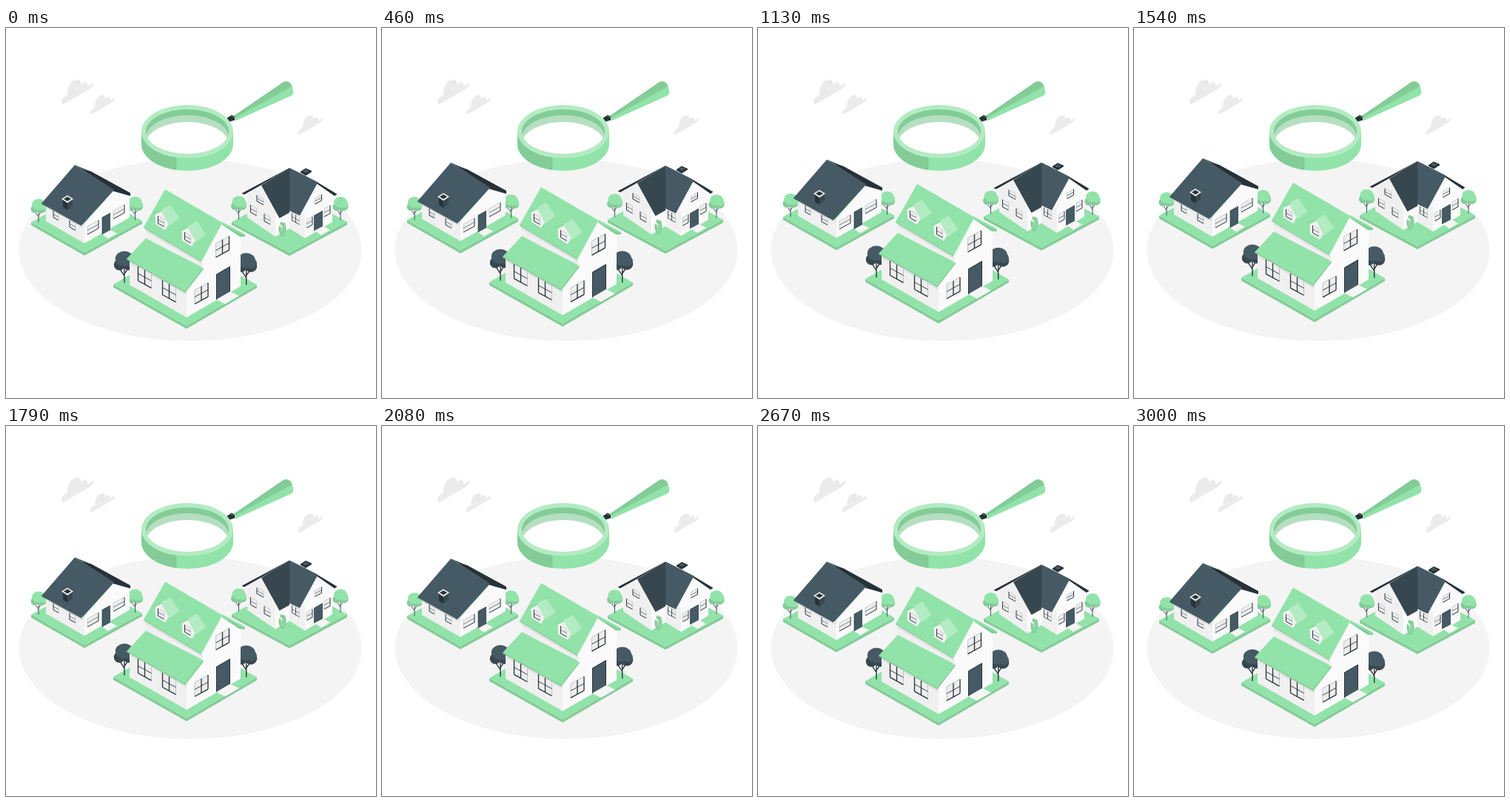
Write an HTML page with a canvas that moves like this. It is 500 by 500 pixels and loops after 3.04 s.

```html
<!DOCTYPE html>
<html lang="en">
<head>
<meta charset="utf-8">
<title>House search</title>
<style>
html, body { margin: 0; width: 100%; height: 100%; overflow: hidden; background: #fff; }
canvas { display: block; width: 500px; height: 500px; }
</style>
</head>
<body>
<canvas></canvas>
<script>
const canvas = document.querySelector('canvas');
const ctx = canvas.getContext('2d');
const ratio = window.devicePixelRatio || 1;
canvas.width = canvas.height = 500 * ratio;

const GREEN = '#92e3a9', SHADE = '#83cc98', PALE = '#b3ebc2';
const SLATE = '#455a64', DEEP = '#37474f', INK = '#263238';
const WALL = '#fafafa', SIDE = '#f0f0f0', GRAY = '#e0e0e0', PATH = '#f5f5f5';
const LOOP = 3040, LEAD = 40, RISE = 9.8;

const fill = (color, d) => {
  ctx.fillStyle = color;
  ctx.fill(new Path2D(d), 'evenodd');
};
const line = (color, width, d) => {
  ctx.strokeStyle = color;
  ctx.lineWidth = width;
  ctx.stroke(new Path2D(d));
};
const poly = (color, points) => fill(color, `M${points}Z`);
const oval = (x, y, rx, ry) =>
  `M${x - rx} ${y}a${rx} ${ry} 0 0 1 ${2 * rx} 0a${rx} ${ry} 0 0 1 ${-2 * rx} 0Z`;

function shifted(x, y, scale, draw) {
  ctx.save();
  ctx.translate(x, y);
  ctx.scale(scale, scale);
  draw();
  ctx.restore();
}

function cloud(x, y, scale) {
  shifted(x, y, scale, () => fill('#ebebeb',
    'M0 25Q-1 19 6 17C6 9 9 2 14 1C18-1 21 2 20 6C23 1 28 2 27 8Q33 2 33 5Q32 9 26 12L2 26Q0 26 0 25Z'));
}

// Isometric lawn from its left, front and right corners
function lawn(lx, ly, fx, fy, rx, ry) {
  poly(SHADE, `${lx} ${ly}L${fx} ${fy}L${rx} ${ry}v4L${fx} ${fy + 4}L${lx} ${ly + 4}`);
  poly(GREEN, `${lx} ${ly}L${fx} ${fy}L${rx} ${ry}L${lx + rx - fx} ${ly + ry - fy}`);
}

function tree(x, y, scale, crown, shade, trunk) {
  shifted(x, y, scale, () => {
    line(trunk, 1, 'M0 2V22M0 15L-4 9M0 13L4 7');
    fill(shade, oval(-5, 4, 5.5, 5.5));
    fill(shade, oval(4.5, 3.5, 6.2, 6));
    fill(crown, oval(0, -2, 9, 7.5));
    fill(crown, oval(6, 1, 4.5, 5));
  });
}
const greenTree = (x, y) => tree(x, y, 1, GREEN, SHADE, SLATE);
const darkTree = (x, y) => tree(x, y, 1.36, SLATE, DEEP, INK);

// dir is 1 on walls facing left and -1 on walls facing right
function pane(x, y, w, h, dir, cross, weight = 1) {
  const dy = w * .55 * dir;
  poly('#ededed', `${x} ${y}l${w} ${dy}v${h}l${-w} ${-dy}`);
  const lit = dir > 0 ? x + w : x, dark = dir > 0 ? x : x + w;
  const top = px => y + (px - x) * .55 * dir;
  line('#b0b8bb', weight * .6, `M${x} ${y}l${w} ${dy}M${lit} ${top(lit)}v${h}`);
  line(INK, weight, `M${dark} ${top(dark)}v${h}M${x} ${y + h}l${w} ${dy}`);
  if (cross) line(INK, weight, `M${x + w / 2} ${y + dy / 2}v${h}`);
  line(cross ? INK : SLATE, weight * .7, `M${x} ${y + h / 2}l${w} ${dy}`);
}

function leftHouse() {
  lawn(34, 262.5, 106, 303.5, 184, 260.5);
  greenTree(44, 240.5);
  greenTree(174.5, 237.5);
  poly(SIDE, '54 238L106 266V291L54 261');
  poly(WALL, '106 264L146 219L167 228V256L106 291');
  poly(GRAY, '54 240L103 268L106 265V268L103 270L54 243');
  poly(SLATE, '93 185L115 194L168 223L146 220');
  poly(INK, '103 191L115 194L168 223V227L145 220.5V218');
  poly(SLATE, '93 185L146 219L102 267L48 237');
  line(DEEP, .7, 'M48 237.2L102 267');
  pane(64, 247, 7, 9, 1);
  pane(86, 260, 8, 9, 1);
  pane(110, 268, 15, 11, -1);
  pane(145, 247, 15, 11, -1);
  poly(PATH, '130 279L141 273L150 277.5L138 284.5');
  poly(SLATE, '130 256L141 250V273L130 279');
  line(INK, .7, 'M130 279V256L141 250');
  poly(INK, '77 232L83 236V246L77 242');
  poly(DEEP, '83 236L90 232V240L83 246');
  poly('#ebebeb', '83 226L91 231L83 236.5L75 231');
  poly(INK, '83 228L88 231L83 234L78 231');
}

function rightHouse() {
  lawn(305, 262, 383, 304, 461, 262);
  greenTree(314.5, 236.5);
  greenTree(452, 237.5);
  poly(WALL, '401 196L405 199L410 196V206H401');
  poly(INK, '405 189.5L413 193V194.5L405 199.5L398 195.5V194');
  poly(SLATE, '405 191L410 193.5L405 196L401 193.5');
  poly(SIDE, '326 219L346 210L372 256L364 282L326 256');
  poly(WALL, '364 250L383 246V271L364 282');
  poly(SIDE, '383 246L404 243V284L383 271');
  poly(WALL, '397 251L421 208L441 223V262L404 284V250');
  poly(INK, '318.5 223.5L383 189L346 211.5L322 225');
  poly(INK, '383 189L420 208L447.5 224.5L444 227L421 211');
  poly(DEEP, '383 189L345 212.5L369.5 257L383 249.5');
  poly(SLATE, '383 189L421.5 208.5L397 253.5L383 247');
  pane(339, 226, 9, 8, 1);
  pane(330.5, 239, 8, 10, 1);
  pane(349, 251, 8, 10, 1);
  pane(386.5, 250, 10, 10, 1, true, .8);
  pane(417.5, 230, 9, 8, -1);
  pane(406.5, 259, 7.5, 11, -1);
  pane(430, 244, 8, 11, -1);
  poly(PATH, '416 273L428 267.5L438 273L426 280');
  poly(SLATE, '416.5 253.5L428 247V268L416.5 274');
  line(INK, .7, 'M416.5 274V253.5L428 247');
  fill(SHADE, 'M372 282Q367 275 369 267Q374 269 374 278Q381 268 373 262Q369 262 371 266Q376 268 376 281Z');
  fill(SHADE, oval(376, 271, 2.6, 8));
  line(PALE, .6, 'M371 270L373 280M377 265L375 279');
}

function dormer() {
  poly(SIDE, '201.5 251L210 247L220 265L215 273L202 265');
  poly(GREEN, '198 251L222 239L210 248L200 253');
  line(SHADE, .8, 'M198 251L210 246');
  poly(PALE, '222 239L234.5 257L220.5 267.5L209.5 246');
  pane(205.5, 254, 8, 10, 1);
}

function middleHouse() {
  lawn(145, 346.5, 244, 402.5, 339, 347);
  darkTree(160, 314.5);
  darkTree(324.7, 317);
  poly(SIDE, '167 312L244 355V391L167 347');
  poly(WALL, '244 355L264 328V313L292 263L317 279V349L244 391');
  poly(GRAY, '168 315L242 357L244 355V361L168 319');
  poly(SIDE, '188 269L264 315L267 324L189 285');
  poly(GRAY, '188 271L264 316L266 320L189 275');
  poly(SHADE, '292 263L323 279.5V282L316 282L292 266');
  poly(GREEN, '292 262L322 278L321 280L291 265');
  poly(GREEN, '215 218L292.5 263L264 315.5L186 269');
  line(SHADE, 1.2, 'M186 269.4L264 315.5');
  line(PALE, 1, 'M264 315.5L292 263.5');
  poly(GREEN, '189 284L267 325L242 357L163 312');
  line(SHADE, 1.4, 'M163.3 312.2L242 356.7L266.6 325');
  dormer();
  shifted(36, 22, 1, dormer);
  pane(178.5, 322, 18, 19.5, 1, true, 1.3);
  pane(211.5, 341, 18, 19.5, 1, true, 1.3);
  pane(255, 354, 18, 19, -1, true, 1.3);
  pane(283.5, 291, 18, 19, -1, true, 1.3);
  poly(PATH, '284 367L303 356L315 362L296 373');
  poly(SLATE, '284 333L303 322V356L284 367');
  line(INK, 1, 'M284.5 367V333L302.5 322.5V356');
}

function magnifier() {
  poly(SHADE, '307 119.3L374 73.5Q380 70 385 75L387 80L309 122.5');
  poly(GREEN, '308 122L386.5 79Q389 84 388 89Q387 91 382 93L310 125.5');
  poly(INK, '298 122L305 117.5L309 120V124.5L301 127');
  poly(SLATE, '303 119L305 117.5L309 120V122');
  fill(GREEN, 'M183 140V157A62 36 0 0 0 307 157V140Z');
  fill(SHADE, 'M183 140V157A62 36 0 0 0 230.5 192V140Z');
  const hole = new Path2D(oval(245, 140, 56, 30));
  fill(PALE, oval(245, 140, 62, 36));
  ctx.save();
  ctx.clip(hole);
  fill(SHADE, 'M180 100H310V180H180Z');
  fill('#b5dfc0', oval(245, 148, 56, 30));
  fill('#fff', oval(245, 157, 56, 30));
  ctx.restore();
}

function draw(now) {
  const phase = (now + LEAD) % LOOP / LOOP;
  const lift = RISE * (1 - Math.abs(1 - 2 * phase));
  ctx.setTransform(ratio, 0, 0, ratio, 0, 0);
  fill('#fff', 'M0 0H500V500H0Z');
  fill('#f4f4f4', oval(249, 300, 231.5, 123));
  cloud(75, 69, 1.31);
  cloud(114, 90.5, 1);
  cloud(395, 118, 1);
  magnifier();
  shifted(0, .3 - lift, 1, () => {
    leftHouse();
    rightHouse();
    middleHouse();
  });
}

const start = performance.now();
function tick() {
  draw(performance.now() - start);
  requestAnimationFrame(tick);
}
tick();
</script>
</body>
</html>
```
